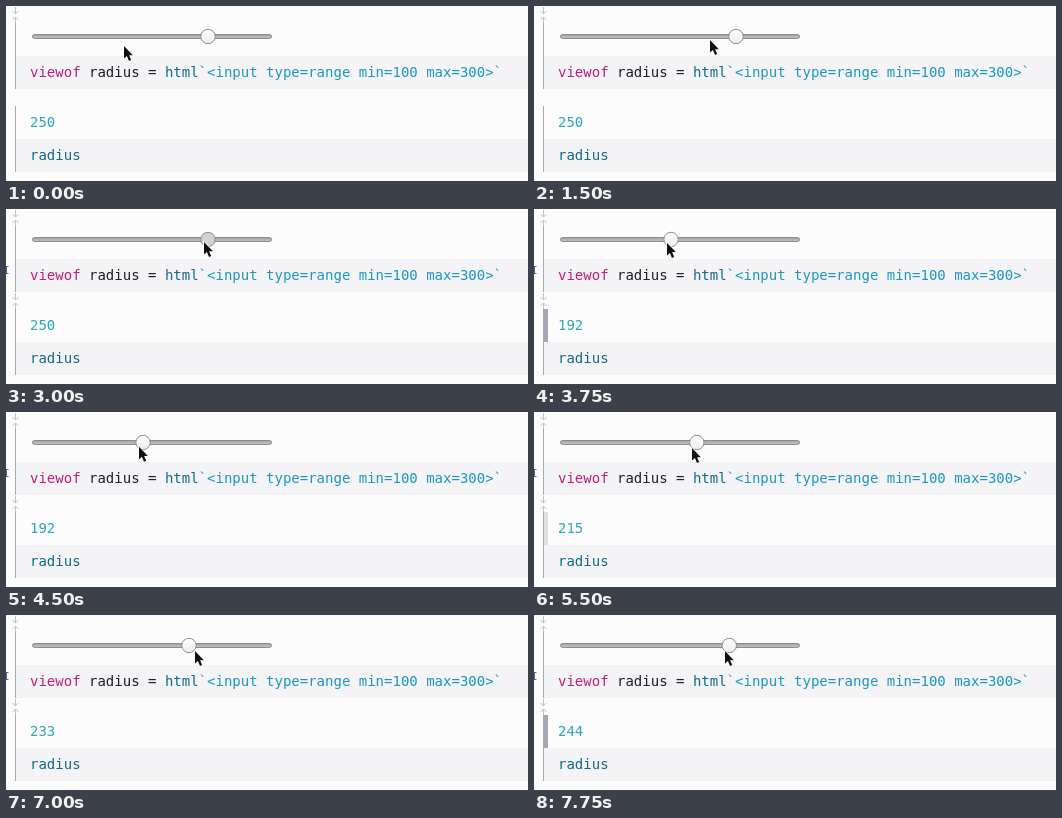
Write an HTML page that moves like this. It is 522 by 175 pixels and loops after 8 s.

```html
<!DOCTYPE html>
<html lang="en">
<head>
<meta charset="utf-8">
<title>Range slider</title>
<style>
html, body { margin: 0; width: 100%; height: 100%; overflow: hidden; background: #fcfcfc; }
svg { display: block; width: 522px; height: 175px; }
text { font: 14px "DejaVu Sans Mono", monospace; white-space: pre; }
.line { fill: none; stroke: #a9a9a9; stroke-width: 1; }
.faint { fill: none; stroke: #c2c2c2; stroke-width: 1; }
.name { fill: #12678c; }
</style>
</head>
<body>
<svg viewBox="0 0 522 175">
  <defs>
    <linearGradient id="groove" x2="0" y2="1">
      <stop stop-color="#a0a0a0"/><stop offset="1" stop-color="#c6c6c6"/>
    </linearGradient>
    <linearGradient id="shine" x2="0" y2="1">
      <stop stop-color="#fff"/><stop offset="1" stop-color="#ebebeb"/>
    </linearGradient>
    <g id="insert" class="faint">
      <path d="M9.5 1V8M6.5 5L9.5 8L12.5 5"/>
      <path d="M9.5 17V11M6.5 14L9.5 11L12.5 14"/>
    </g>
  </defs>
  <rect width="522" height="175" fill="#fcfcfc"/>
  <path d="M10 50H522V83H10ZM10 133H522V166H10Z" fill="#f4f4f6"/>
  <path class="line" d="M9.5 13V83M9.5 100V166"/>
  <use href="#insert"/>

  <g id="focus">
    <use href="#insert" y="83"/>
    <path d="M0 57H2.5V58H1V64H2.5V65H0Z" fill="#4a66c4"/>
  </g>
  <rect id="bar" x="9" y="100" width="5" height="33" fill="#a5a8b3"/>

  <rect x="26.5" y="28.5" width="239" height="4" rx="2" fill="url(#groove)" stroke="#8c8c8c"/>
  <circle id="knob" cy="30.5" r="7.2" stroke="#8c8c8c"/>

  <text x="24" y="71"><tspan fill="#c41a78">viewof</tspan><tspan fill="#1b1e23"> radius = </tspan><tspan class="name">html</tspan><tspan fill="#1b96c6">`&lt;input type=range min=100 max=300&gt;`</tspan></text>
  <text id="value" x="24" y="121" fill="#2aa6b8"></text>
  <text class="name" x="24" y="154">radius</text>

  <path id="cursor" d="M0 0V12.6L2.9 10L5 15L7.2 14L5.1 9.2H8.9Z"
    fill="#111" stroke="#fff" stroke-width="1.6" paint-order="stroke" stroke-linejoin="round"/>
</svg>
<script>
const LOOP = 8000, STEP = 250;
const [focus, bar, knob, value, cursor] =
  ["focus", "bar", "knob", "value", "cursor"].map(id => document.getElementById(id));

// Key points: time, position
const drag = [[3000, 250], [3750, 192], [4500, 192], [5500, 215], [7000, 233], [7750, 244]];
const handX = [[0, 118], [750, 200], [1500, 176], [2250, 204], [3000, 198],
  [3750, 133], [4500, 133], [5500, 158], [7000, 189], [7750, 191]];
const handY = [[0, 40], [750, 22], [1500, 34], [3000, 33], [5500, 36]];

const clamp = n => Math.min(1, Math.max(0, n));

function along(keys, t) {
  return keys.reduce((at, [end, to], i) => {
    if (!i) return to;
    const [start, from] = keys[i - 1];
    return at + (to - from) * clamp((t - start) / (end - start));
  }, 0);
}

// The change marker lights up, holds, then fades
function glow(t) {
  const age = (t - 3500) % 1250;
  return t < 3500 ? 0 : clamp(1 - (age - 500) / 375);
}

function draw(now) {
  const t = Math.floor(now % LOOP / STEP) * STEP;
  const v = Math.round(along(drag, t));

  value.textContent = v;
  knob.setAttribute("cx", 34 + (v - 100) * 1.12);
  knob.setAttribute("fill", t >= 2750 && t <= 3000 ? "#d3d3d3" : "url(#shine)");
  cursor.setAttribute("transform", `translate(${along(handX, t)} ${along(handY, t)})`);
  focus.setAttribute("visibility", t >= 2000 ? "visible" : "hidden");
  bar.setAttribute("opacity", glow(t));
}

function tick(now) {
  draw(now);
  requestAnimationFrame(tick);
}
draw(0);
requestAnimationFrame(tick);
</script>
</body>
</html>
```
